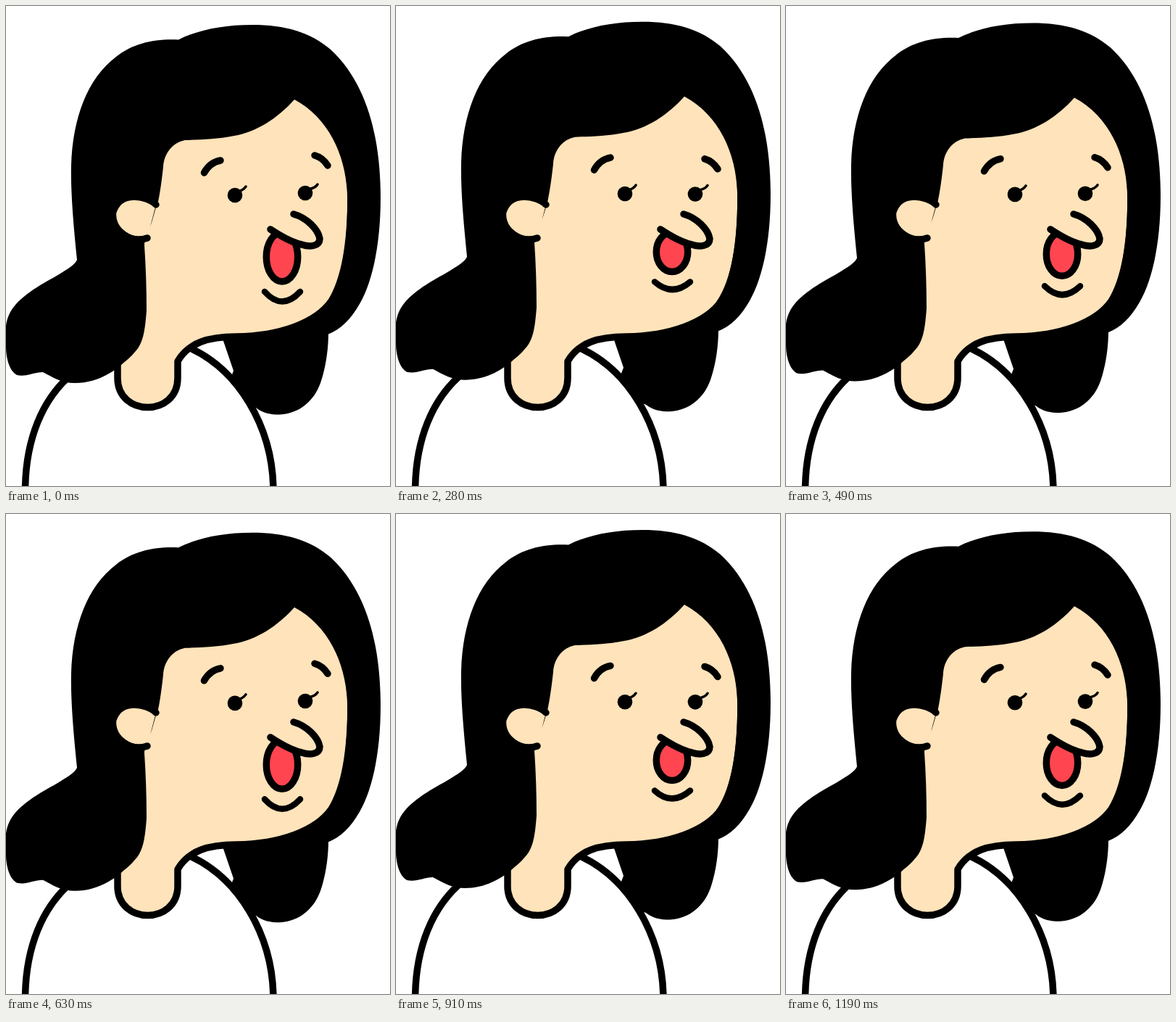
An HTML page without scripts that plays this animation: 530x662 px, repeating every 1.26 s.

```html
<!DOCTYPE html>
<html lang="en">
<head>
<meta charset="utf-8">
<title>Singing woman</title>
<style>
  /* --p: 1 = mouth wide open, 0 = mouth at its smallest */
  @property --p { syntax: "<number>"; inherits: true; initial-value: 1; }

  html, body { margin: 0; width: 100%; height: 100%; overflow: hidden; background: #fff; }
  svg { display: block; width: 100vw; height: 100vh; animation: sing 1.26s step-end infinite; }

  @keyframes sing {
    0% { --p: 1 }
    5.5556% { --p: .9 }
    11.1111% { --p: .61 }
    16.6667% { --p: .26 }
    22.2222% { --p: .03 }
    27.7778% { --p: .02 }
    33.3333% { --p: .16 }
    38.8889% { --p: .45 }
    44.4444% { --p: .75 }
    50% { --p: .95 }
    55.5556% { --p: .99 }
    61.1111% { --p: .86 }
    66.6667% { --p: .5 }
    72.2222% { --p: .11 }
    77.7778% { --p: 0 }
    83.3333% { --p: .05 }
    88.8889% { --p: .27 }
    94.4444% { --p: .6 }
  }

  .skin { fill: #ffe3ba; }
  .line { stroke: #000; stroke-width: 9.5; stroke-linecap: round; stroke-linejoin: round; }
  .none { fill: none; }
  .lash { stroke-width: 3.5; }

  .move { transform: translateY(calc((var(--p) - 1) * var(--d) * 1px)); }
  .hair { --d: 4.5; }
  .brow-l { --d: 4; }
  .brow-r { --d: -5; }
  .eye-l { --d: 2; }
  .eye-r { --d: -1.5; }

  .mouth {
    fill: #ff4550;
    cy: calc((339 + 7 * var(--p)) * 1px);
    ry: calc((27 + 7 * var(--p)) * 1px);
  }
  .chin {
    transform: translateY(calc((380 + 14 * var(--p)) * 1px)) scaleY(calc(.78 + .22 * var(--p)));
    vector-effect: non-scaling-stroke;
    stroke-width: 8.5;
  }
</style>
</head>
<body>
<svg viewBox="0 0 530 662">
  <!-- back hair -->
  <path class="move hair" d="M298 440L300 462 314 503 300 540 345 554C355 562 365 563.500 378 563.500C405 562 425 545 434 520C441 500 445 475 445 450L455 400 330 430Z"/>

  <!-- shirt -->
  <path class="line" fill="#fff" d="M26.500 670C26.500 600 49 541 94 505L200 470H250C320 500 369 580 369 670"/>

  <!-- face and neck -->
  <path class="skin line" d="M154 490L185 150 408 108C455 150 476 205 476 262C476 325 468 376 449 407C428 437 378 455 318 456C280 456 252 464 237 490V513C237 567 154 567 154 513Z"/>

  <!-- front hair -->
  <path class="move hair" d="M98 350C94 310 89 260 90 220C92 155 112 100 152 70C176 51 206 45 238 46.500C265 33 300 26 340 26C385 26 420 36 448 60C500 108 517 185 517 265C517 325 507 378 488 411C476 432 462 446 444 453L430 436 443 411C465 380 472 320 471 262C470 210 447 155 398 129C375 155 345 174 315 179C290 184 270 184 247 185C228 189 218 205 217 222C215 240 213 255 210 270C205 300 192 310 191 330C193 360 194 390 194 420C192 445 190 465 178 477C172 485 164 490 157 497C140 510 120 520 95 520C75 520 63 511 51 505C38 505 28 512 15 509C3 502 0 482 0 470C-1 450 -2 437 6 422C18 401 45 386 70 372C85 363 96 356 98 350Z"/>

  <!-- ear -->
  <path class="skin" d="M208 274L214 290 200 322 195 320Z"/>
  <path class="skin line" d="M207 274C195 262 157 253 147.500 285C146 310 172 328 195 320"/>

  <!-- brows and eyes -->
  <path class="line none move brow-l" d="M273.500 230Q281 216 296 213"/>
  <path class="line none move brow-r" d="M426 206Q437 209 444 220"/>
  <g class="move eye-l">
    <circle cx="316" cy="261" r="10.300"/>
    <path class="line none lash" d="M320 256Q328 254 331 249"/>
  </g>
  <g class="move eye-r">
    <circle cx="413" cy="258" r="10.300"/>
    <path class="line none lash" d="M417 253Q427 251 430 246"/>
  </g>

  <!-- mouth, nose, chin -->
  <ellipse class="line mouth" cx="381" rx="21.700"/>
  <path class="skin line" d="M365 308C380 318 395 326 408 329C420 333 433 331 433 321C431 308 415 292 397 287"/>
  <path class="line none chin" d="M357 0Q381 27 406 0"/>
</svg>
</body>
</html>
```
